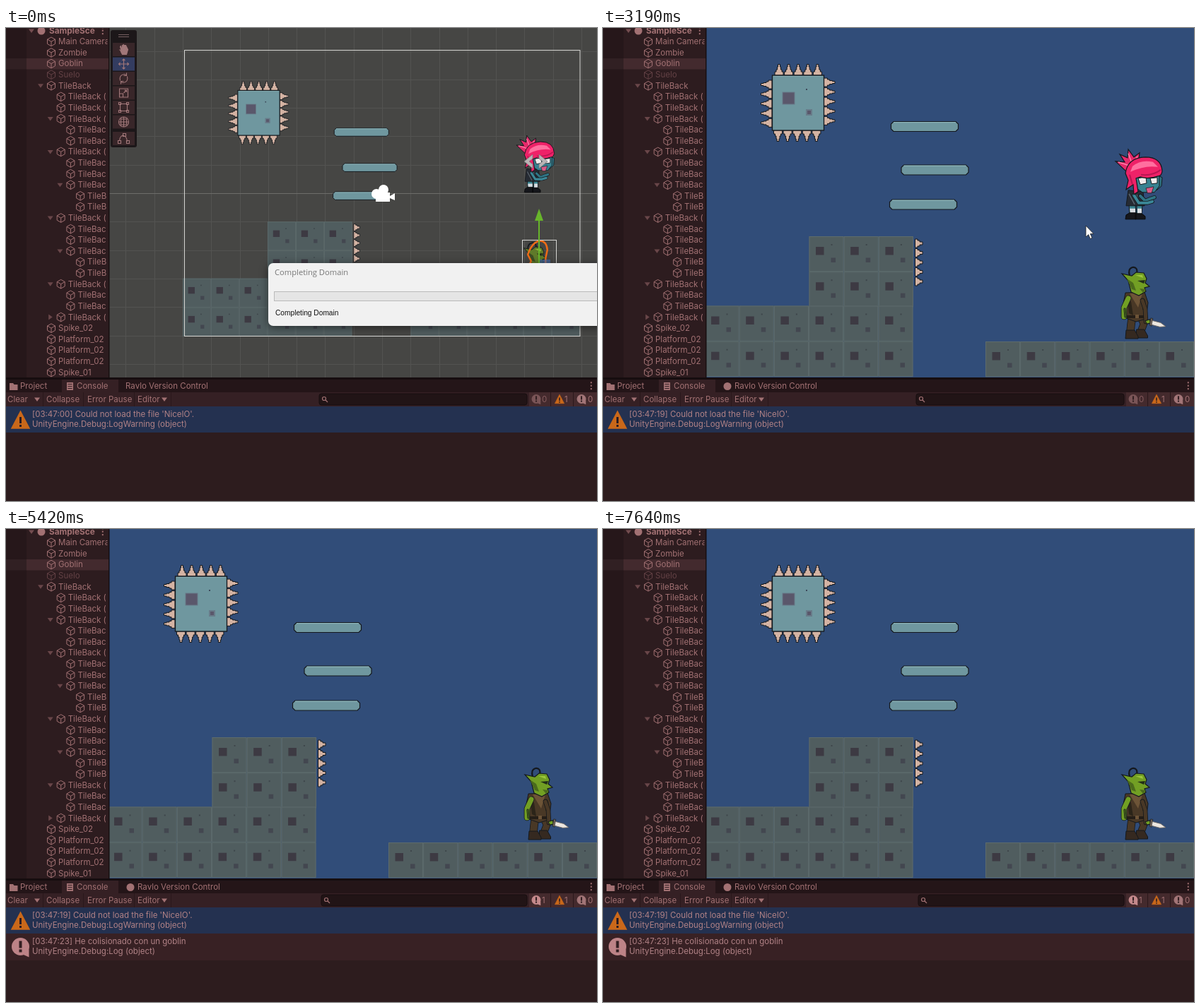
An HTML page with a canvas that plays this animation: 836x670 px, repeating every 7710 ms.

```html
<!DOCTYPE html>
<html lang="en">
<head>
<meta charset="utf-8">
<title>Editor play mode</title>
<style>
  html, body { margin: 0; width: 100%; height: 100%; overflow: hidden; background: #2d1c1e; }
  canvas { display: block; }
</style>
</head>
<body>
<canvas id="stage" width="836" height="670"></canvas>
<script>
const g = document.getElementById('stage').getContext('2d');
const LOOP = 7710, FADE = 1290, PLAY = 1970, FALL = 2860, HIT = 3490;
const UI = '#a27173', INK = '#14181d', STEEL = '#6f979f', TAN = '#d4b3a3';

const rect = (x, y, w, h, color) => { g.fillStyle = color; g.fillRect(x, y, w, h); };
const frame = (x, y, w, h, color, width = 1) => {
  g.strokeStyle = color; g.lineWidth = width; g.strokeRect(x, y, w, h);
};
function shape(d, fill, stroke, width = 1) {
  const path = new Path2D(d);
  if (fill) { g.fillStyle = fill; g.fill(path); }
  if (stroke) { g.strokeStyle = stroke; g.lineWidth = width; g.stroke(path); }
}
function limb(d, color, width) {
  g.save();
  g.lineJoin = g.lineCap = 'round';
  shape(d, null, INK, width + 1.6);
  shape(d, null, color, width);
  g.restore();
}
function disc(x, y, r, fill, stroke, width = 1) {
  g.beginPath(); g.arc(x, y, r, 0, 7);
  if (fill) { g.fillStyle = fill; g.fill(); }
  if (stroke) { g.strokeStyle = stroke; g.lineWidth = width; g.stroke(); }
}
function text(s, x, y, color = UI, font = '11.5px Inter, sans-serif') {
  g.font = font; g.fillStyle = color; g.textBaseline = 'middle'; g.fillText(s, x, y + .5);
}
function at(x, y, draw, angle = 0, scale = 1) {
  g.save(); g.translate(x, y); g.rotate(angle); g.scale(scale, scale); draw(); g.restore();
}
function clipped(x, y, w, h, draw) {
  g.save(); g.beginPath(); g.rect(x, y, w, h); g.clip(); draw(); g.restore();
}
const foldDown = (x, y, color) => at(x, y, () => shape('M-4-2.5H4L0 3Z', color));

// ---- Hierarchy ----
const ROOTS = ['Main Camera', 'Zombie', 'Goblin', 'Suelo', 'TileBack',
  'Spike_02', 'Platform_02', 'Platform_02', 'Platform_02', 'Spike_01'];
const NESTED = ['', 'TileBack (', 'TileBac', 'TileB'];
const TREE = '0 0 0 0 0v 1 1 1v 2 2 1v 2 2 2v 3 3 1v 2 2 2v 3 3 1v 2 2 1> 0 0 0 0 0'.split(' ');

function hierarchy() {
  rect(0, 0, 146, 496, '#2d1c1f');
  rect(0, 0, 29, 496, '#26171a');
  rect(0, 43, 29, 15.5, '#312023');
  rect(29, 43, 116, 15.5, '#432a2e');
  foldDown(36, 4, '#744d50');
  disc(50, 4, 5.5, UI);
  text('⋮', 130, 4, UI, 'bold 13px Inter, sans-serif');
  clipped(0, 0, 143.5, 496, () => {
    text('SampleSce', 61, 4, UI, 'bold 11.8px Inter, sans-serif');
    let root = 0;
    TREE.forEach((node, i) => {
      const depth = +node[0], x = 64 + depth * 13.7, y = 19.3 + i * 15.61;
      const label = NESTED[depth] || ROOTS[root++];
      const color = label === 'Suelo' ? '#634145' : UI;
      at(x, y, () => shape('M0-6.3L5.5-3.2V3.2L0 6.3L-5.5 3.2V-3.2ZM-5.5-3.2L0 0L5.5-3.2M0 0V6.3', null, color));
      text(label, x + 10, y, color);
      if (node[1] === 'v') foldDown(x - 15, y, '#694649');
      if (node[1] === '>') at(x - 15, y, () => shape('M-4-2.5H4L0 3Z', '#694649'), -Math.PI / 2);
    });
  });
  rect(145, 0, 1.5, 496, '#170e10');
}

// ---- Console ----
function warning(x, y, size) {
  at(x, y, () => {
    shape('M0-12L12.5 12H-12.5Z', '#c9681a', '#c9681a', 1.5);
    rect(-1.5, -4, 3, 9, '#2b1d22'); rect(-1.5, 7, 3, 3, '#2b1d22');
  }, 0, size);
}
function bubble(x, y, size, color) {
  at(x, y, () => {
    disc(0, 0, 12.5, color);
    shape('M3 11L12 15V4Z', color);
    rect(-2, -8, 4, 10, '#331f22'); rect(-2, 4, 4, 4, '#331f22');
  }, 0, size);
}
function logEntry(y, first, second) {
  text(first, 37, y + 11, '#b18286');
  text(second, 37, y + 25.5, '#b18286');
}
function console_(t) {
  const playing = t >= PLAY, hit = t >= HIT;
  rect(0, 495, 836, 175, '#2d1c1e');
  rect(0, 495, 836, 3, '#160d0f');
  rect(0, 498, 836, 18, '#241518');
  rect(79, 498, 80, 18, '#352024');
  shape('M5 503H10L11.5 505H16.5V513H5Z', UI);
  text('Project', 20, 507.5);
  shape('M86 502H95V513H86Z', UI);
  for (let y = 504; y < 512; y += 3) rect(87.5, y, 6, 1, '#352024');
  text('Console', 100, 507.5);
  if (playing) disc(176, 507.5, 5.5, UI);
  text('Ravlo Version Control', playing ? 186 : 169, 507.5);
  text('⋮', 821, 507, UI, 'bold 13px Inter, sans-serif');

  rect(0, 516, 836, 20, '#352024');
  text('Clear', 2, 526);
  text('Collapse', 57, 526);
  text('Error Pause', 115, 526);
  text('Editor', 186, 526);
  foldDown(44, 526, UI); foldDown(224, 526, UI);
  for (const x of [52, 109, 181, 233]) rect(x, 516, 1, 20, '#2a181b');
  const left = hit ? 446 : 443;
  g.beginPath(); g.roundRect(left, 518, 737 - left, 16, 3);
  g.fillStyle = '#211416'; g.fill(); g.strokeStyle = '#170d0f'; g.lineWidth = 1; g.stroke();
  disc(left + 7, 525, 2.5, null, UI, 1.2);
  at(left + 9, 527, () => shape('M0 0L3 3', null, UI, 1.2));
  rect(740, 516, 96, 20, '#442a2d');
  rect(770, 516, 1, 20, '#2a181b'); rect(802, 516, 1, 20, '#2a181b');
  bubble(750, 525.5, .52, hit ? '#c4898b' : '#7a5557');
  text(hit ? '1' : '0', 758, 526, hit ? UI : '#865c5f');
  warning(783, 525.5, .52);
  text('1', 790, 526);
  bubble(814, 525.5, .52, '#a27577');
  text('0', 823, 526);

  rect(0, 536, 836, 37, '#243150');
  warning(20.5, 555, 1);
  logEntry(536, `[03:47:${playing ? 19 : '00'}] Could not load the file 'NiceIO'.`, 'UnityEngine.Debug:LogWarning (object)');
  if (hit) {
    rect(0, 573, 836, 38, '#382124');
    bubble(20.5, 591.5, 1, '#bd8387');
    logEntry(573, '[03:47:23] He colisionado con un goblin', 'UnityEngine.Debug:Log (object)');
  }
}

// ---- World, in game view coordinates ----
const spike = (x, y, angle) => at(x, y, () =>
  shape('M-6 0V-5H-4V-8H-2.5V-12H-1.5V-15.5H1.5V-12H2.5V-8H4V-5H6V0Z', TAN, INK), angle);

function spikeBlock() {
  for (let i = 0; i < 5; i++) {
    const step = i * 13.6;
    spike(249 + step, 67, 0);
    spike(247.5 + step, 145, Math.PI);
    spike(239, 80 + step, -Math.PI / 2);
    spike(312.5, 77 + step, Math.PI / 2);
  }
  rect(239.5, 67, 73, 78, STEEL);
  frame(239.5, 67, 73, 78, INK, 1.3);
  rect(241, 68, 70, 1, '#84abb1');
  rect(254, 91, 17, 17, '#5a576b'); frame(254, 91, 17, 17, '#687b89');
  rect(287, 115, 9, 9, '#687b89'); rect(289, 117, 5, 5, '#5a576b');
  rect(287, 86, 2, 2, '#3e4b5c');
}
function platform(x, y) {
  at(x, y, () => {
    shape('M4 .5H92L95.5 4V11L92 14.5H4L.5 11V4Z', STEEL, INK, 1.2);
    rect(4, 1.2, 88, 1, '#95bcc0');
  });
}
function tile(x, y) {
  rect(x, y, 48.8, 50, '#505d5f');
  frame(x + .5, y + .5, 48, 49.2, '#5d6b6c');
  rect(x + 9.5, y + 15, 11.5, 11.5, '#3d3a43');
  rect(x + 31, y + 30.5, 6.5, 6.5, '#434750');
  rect(x + 31, y + 11, 2, 2, '#3e464b');
}
function tiles(x, y, columns, rows) {
  for (let r = 0; r < rows; r++)
    for (let c = 0; c < columns; c++) tile(x + c * 49.2, y + r * 50.2);
}
function zombie(drop) {
  at(725, 145 + drop, () => {
    // legs and boots
    shape('M19 78H28L29 92H20ZM30 78H38L37 92H30Z', '#3c8591', INK);
    shape('M20 84H28V91H21ZM31 84H37V91H31Z', '#d8dbe0');
    shape('M15 93L20 90H29V99H14ZM28 91H37L42 95V99H28Z', '#15161b', '#08090b');
    // jacket and skirt
    shape('M18 58L39 60L41 80L15 80Z', '#262b33', INK);
    shape('M19 63L27 78M30 64L33 78', null, '#5f6872', 1.3);
    // arms
    limb('M35 66L42 73L49 70L55 68', '#2f7484', 4);
    limb('M26 65L33 76L45 76L52 74', '#3b8797', 4);
    // face
    shape('M60 37L66 40L65 52L58 58Z', '#2f7484', INK);
    shape('M27 36H62V52L55 61H38L28 54Z', '#388291', INK);
    shape('M32 41L43 39L44 48L35 50ZM49 41L59 40L59 48L51 49Z', '#f1ecec', INK);
    shape('M43 55L54 53L51 62L45 62Z', '#d95a86', INK, .7);
    // hair
    shape('M17 33L0 17L13 18L6 7L17 12L18 0L26 11L34 5L33 14L40 18L24 35Z', '#e62a6b', INK, 1.2);
    shape('M4 18L19 23M18 6L24 22M31 10L25 22', null, '#ff8fb2', 1.3);
    shape('M14 34Q17 12 42 11Q65 11 66 31Q65 38 60 38Q46 43 35 39L29 41L32 60L26 64L25 50L15 57L18 44Z', '#ee2268', INK, 1.2);
    shape('M24 24Q36 14 53 18L60 25Q42 22 21 32Z', '#ff6f9f');
    shape('M20 36L24 50M36 36Q52 38 64 29', null, '#b91552', 2);
  });
}
function goblin(phase, stride, dim) {
  const swing = Math.cos(phase * 2 * Math.PI), swordY = 406 + 12 * swing;
  const skin = dim ? '#5f7a2a' : '#729f24', dark = dim ? '#3c4c24' : '#4b6b1c';
  const vest = dim ? '#3f3828' : '#493826', boot = '#352920', strap = '#6d5437';
  const lean = (1 - swing) * 4, bob = (swing - 1) * .7, bend = (swing + 1) * 2.5;
  // top knot
  at(755, 347 + bob, () =>
    shape(`M0 2Q2-9 ${-6 - lean / 2}-8Q${-13 - lean}-6 ${-10 - lean * 1.9} 4`, null, INK, 2.2));
  // legs
  const left = 746 - stride * 2, right = 758 + stride * 14 + bend / 2;
  limb(`M759 406L${760 + bend + stride * 5} 419L${right} 431`, vest, 9);
  shape(`M${right - 6} 427H${right + 5}L${right + 10} 436V439H${right - 6}Z`, boot, INK);
  limb(`M749 406L${747 + stride * 2} 420L${left} 431`, vest, 10);
  shape(`M${left - 6} 428H${left + 6}L${left + 11} 437V440H${left - 7}Z`, boot, INK);
  at(0, bob, () => {
    // torso
    shape('M739 375L766 374L771 389L768 412L754 416L740 411L736 390Z', vest, INK);
    shape('M745 376L757 396L763 376Z', strap);
    shape('M741 381L744 404L750 407L747 388ZM767 383L763 399L768 403Z', '#2b2419');
    shape('M740 407H768V411H740Z', '#251e17');
    rect(753, 406, 5, 5, strap);
    // head
    shape('M743 358L734 348L748 351L754 346L765 347L769 355L767 361L773 366L766 368L768 373L758 379L747 374Z', skin, INK, 1.2);
    shape('M741 355L750 361L754 372L748 370ZM759 369L768 370L764 375Z', dark);
    shape('M756 358L767 357L765 362Z', '#222f17');
    shape('M753 350L763 350L764 354Z', '#9dc83c');
  });
  // near arm
  limb(`M743 ${383 + bob}L${737 + stride * 7} 396L${737 + stride * 6} 409`, dim ? '#4c5529' : skin, 7);
  limb(`M${738 + stride * 7} 398L${739 + stride * 6} 409`, dark, 1.5);
  // sword arm and blade
  limb(`M763 386L767 ${395 + swing * 3}L768 ${swordY - 2}`, vest, 5);
  at(769, swordY - 3, () => {
    shape('M-2 0L4-3L6 2L1 4Z', skin, INK);
    shape('M5-5L8-5L8 6L5 5Z', '#6f6255', INK, .6);
    shape('M8-2L20-1L28 3L20 5L8 4Z', '#ece6df', '#6c655f', .8);
  }, Math.max(0, swing - .5) * .35, 1 - stride * .2);
}
function world(t) {
  const fallen = Math.max(0, t - FALL);
  spikeBlock();
  platform(407, 132); platform(421.5, 193.5); platform(405, 242.5);
  zombie(.000245 * fallen * fallen);
  tiles(291.5, 295, 3, 2);
  tiles(143.5, 393.5, 6, 2);
  tiles(541, 444, 6, 1);
  for (let i = 0; i < 5; i++) at(441.5, 305 + i * 13.5, () =>
    shape('M0-6H3.5V-4H6.5V-2H10.5V2H6.5V4H3.5V6H0Z', TAN, INK));
  const lift = Math.min(0, -7 + .000245 * fallen * fallen), waiting = lift < 0;
  at(waiting ? 4 : 0, lift, () =>
    goblin(waiting ? 1 / 6 : (t - 3190) / 1112, waiting ? 1 : 0, t < 2200));
}

// ---- Scene view ----
const TOOLS = [
  'M-5 1L-2 7H4L6 0L4-4V1L3-6L1-6V0L0-7L-2-6V1L-4-5L-5-4L-3 3L-6 0Z',
  'M0-7V7M-7 0H7M-2-5L0-7L2-5M-2 5L0 7L2 5M-5-2L-7 0L-5 2M5-2L7 0L5 2',
  'M-5 3Q-7-5 1-6L4-5M5-3Q7 5-1 6L-4 5M4-8V-4H0M-4 8V4H0',
  'M-6-6H6V6H-6ZM-6 1H-1V6M0 0L4-4M1-4H4V-1',
  'M-5-5H5V5H-5ZM-7-7H-4V-4H-7ZM4-7H7V-4H4ZM-7 4H-4V7H-7ZM4 4H7V7H4Z',
  'M0-7V7M-7 0H7M-4-4H4V4H-4ZM-5-5Q0-9 5-5Q9 0 5 5Q0 9-5 5Q-9 0-5-5',
  'M-6 3Q-5-5 0-4Q4-3 5 4M-8 3H-4V7H-8ZM4 3H8V7H4ZM-1-7H3V-3H-1Z'
];
function toolbar() {
  g.beginPath(); g.roundRect(148, 3, 37, 166, 3); g.fillStyle = '#1c1719'; g.fill();
  rect(159, 9, 15, 1, '#766062'); rect(159, 12, 15, 1, '#766062');
  TOOLS.forEach((d, i) => {
    const y = i < 6 ? 30.5 + i * 20.5 : 156.5;
    rect(151, y - 9.5, 31, 19, i === 1 ? '#333c60' : '#382629');
    at(166.5, y, () => shape(d, i ? null : '#a17779', '#a17779', 1.1));
  });
}
function gizmos() {
  frame(252.5, 31.5, 559.5, 405, '#d6d6d3');
  // camera
  disc(524, 235, 7, '#fff'); disc(534, 229, 7, '#fff');
  shape('M523 233H543V246H523ZM543 238L550 234V244L543 241Z', '#fff');
  // script marker
  shape('M745 179L733 189L745 199V193L740 189L745 185ZM754 179L766 189L754 199V193L759 189L754 185Z', '#b9b4b5', '#77777a', .7);
  // selection and move handles
  frame(730.5, 300.5, 48, 86, '#d6d6d3');
  rect(753, 272, 2, 72, '#68b52b');
  shape('M754 256L760 273H748Z', '#68b52b');
  rect(754, 343, 66, 2, '#d54b2c');
  shape('M836 344L819 338V350Z', '#d54b2c');
  rect(755, 328, 15, 15, '#4677c888');
}
function sceneView(t) {
  rect(146, 0, 690, 495, '#464644');
  for (let x = 532 - 9 * 40.3; x < 836; x += 40.3) rect(Math.round(x), 0, 1, 495, '#535351');
  for (let y = 234 - 5 * 40.3; y < 495; y += 40.3) rect(146, Math.round(y), 690, 1, '#535351');
  rect(146, 234, 690, 1, '#6d6d6a');
  g.save();
  g.translate(532, 234); g.scale(1 / 1.232, 1 / 1.226); g.translate(-491, -245.5);
  world(t);
  // selection outline around the goblin
  shape('M751 364L745 352Q752 331 766 328Q778 329 779 344L776 358L776 372L779 388L777 411L789 429M751 364L739 380L737 405L742 430', null, '#ef6b16', 3);
  g.restore();
  gizmos();
  toolbar();
}
function dialog(t) {
  if (t >= 1460) return;
  g.save();
  g.globalAlpha = t < FADE ? 1 : 1 - (t - 1230) / 230;
  g.shadowColor = '#0008'; g.shadowBlur = 12; g.shadowOffsetY = 2;
  g.beginPath(); g.roundRect(371, 333, 490, 89, 7); g.fillStyle = '#f1f1f1'; g.fill();
  g.shadowColor = 'transparent';
  text('Completing Domain', 380, 347, '#777', '11.2px "Open Sans", sans-serif');
  rect(379, 373, 470, 14, '#e5e5e5');
  frame(379.5, 373.5, 470, 13, '#bababa');
  text('Completing Domain', 381, 403.5, '#111', '10.2px "Liberation Sans", sans-serif');
  g.restore();
}

// ---- Pointer ----
const PATH = [[2600, 670, 675], [2680, 672, 638], [3080, 683, 280], [4330, 683, 280],
  [4750, 745, 560], [5100, 800, 675], [6600, 686, 675], [6710, 684, 657], [6860, 692, 672]];
function pointer(t) {
  const i = PATH.findIndex(p => p[0] > t);
  if (i < 1) return;
  const [t0, x0, y0] = PATH[i - 1], [t1, x1, y1] = PATH[i], k = (t - t0) / (t1 - t0);
  at(x0 + (x1 - x0) * k, y0 + (y1 - y0) * k, () =>
    shape('M0 0V16L3.7 12.6L6.2 18.5L8.8 17.3L6.3 11.6H11Z', '#fff', '#222', .8));
}

const start = performance.now();
function draw() {
  const t = (performance.now() - start) % LOOP;
  clipped(146, 0, 690, 495, () => {
    if (t < PLAY) sceneView(t);
    else { rect(146, 0, 690, 495, '#314d79'); world(t); }
  });
  hierarchy();
  console_(t);
  dialog(t);
  pointer(t);
  requestAnimationFrame(draw);
}
draw();
</script>
</body>
</html>
```
